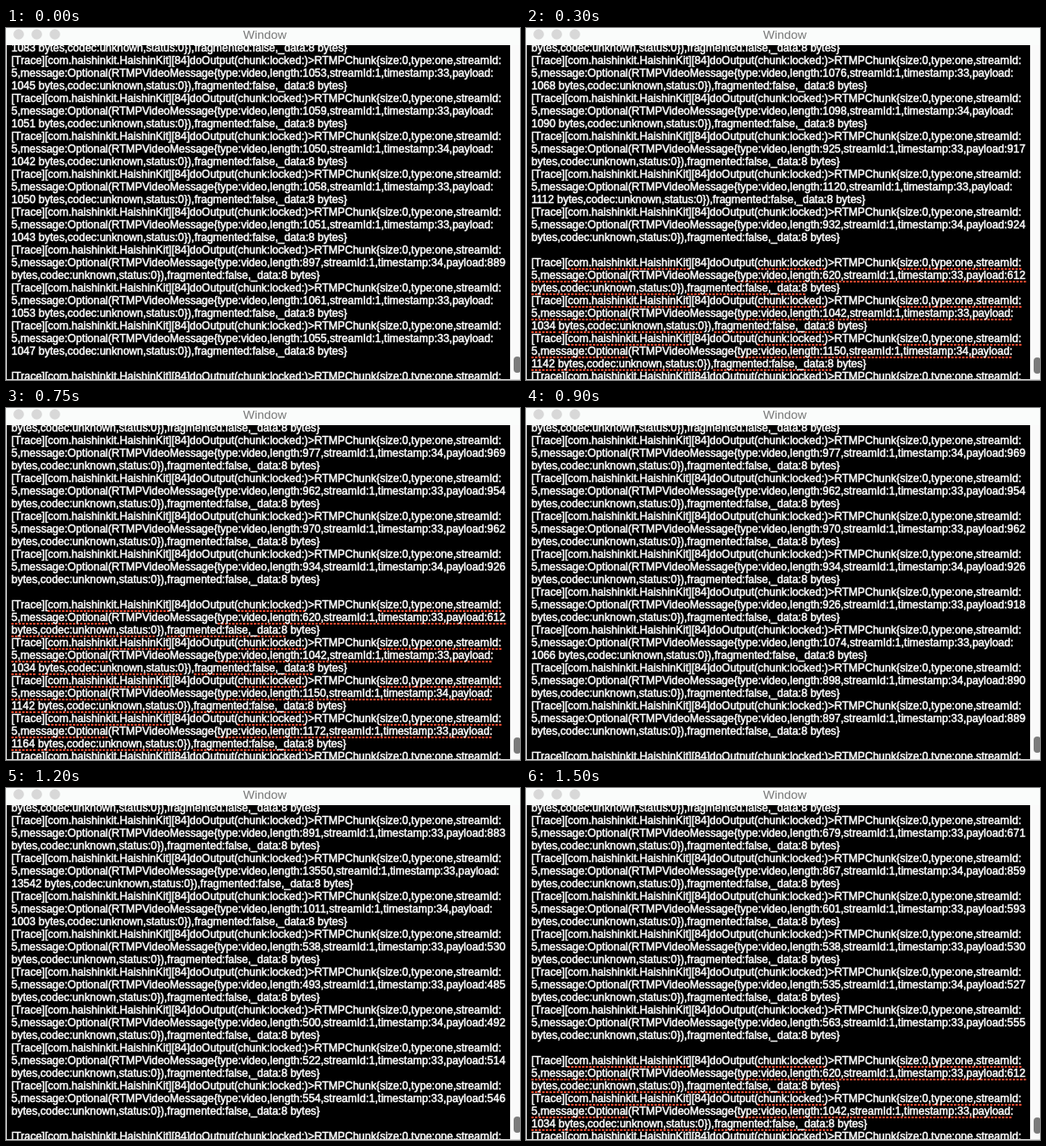
These frames come from a looping animation (568x390 px, 1600 ms). An HTML page with a canvas:

```html
<!DOCTYPE html>
<html lang="en">
<head>
<meta charset="utf-8">
<title>Window</title>
<style>
  html, body { margin: 0; width: 100%; height: 100%; overflow: hidden; background: #fff; }
  canvas { display: block; }
</style>
</head>
<body>
<canvas id="stage" width="568" height="390"></canvas>
<script>
const ctx = document.getElementById('stage').getContext('2d');
const STEP = 150, LOOP = 1600;
const LEFT = 6, LINE = 14, TOP = 26;
const FONT = '"Liberation Sans", Arial, sans-serif';
const MISSPELT = /com[^\]]+|chunk:locked:|size.*|5,message:Optional|type:video.*|^\d{4}(?= )|bytes,[^}]*|fragmented.*8(?= )/g;

// Each screen: timestamp phase, packet lengths, payload cut off at the top
const screens = [
  { phase: 0, sizes: [1053, 1059, 1050, 1058, 1051, 897, 1061, 1055], head: '1083 ' },
  { phase: 0, sizes: [1064, 921, 1072, 1085, 928], head: '1049 ' },
  { phase: 1, sizes: [1076, 1098, 925, 1120, 932] },
  { phase: 2, sizes: [918, 1090, 1069, 912, 941] },
  { phase: 0, sizes: [905, 1082, 924, 905, 955] },
  { phase: 2, sizes: [977, 962, 970, 934] },
  { phase: 2, sizes: [977, 962, 970, 934, 926, 1074, 898, 897] },
  { phase: 1, sizes: [903, 895, 1046, 889, 910, 894, 902, 1038] },
  { phase: 0, sizes: [891, 13550, 1011, 538, 493, 500, 522, 554] },
  { phase: 1, sizes: [586, 643, 612, 574, 559, 598] },
  { phase: 1, sizes: [679, 867, 601, 538, 535, 563] }
];
const pending = [620, 1042, 1150, 1172, 1160];
const ending = 'bytes,codec:unknown,status:0}),fragmented:false,_data:8 bytes}';

function packetLines(size, phase) {
  const payload = size - 8;
  const wraps = size > 999;
  const stamp = phase % 3 === 2 ? 34 : 33;
  return [
    '[Trace][com.haishinkit.HaishinKit][84]doOutput(chunk:locked:)>RTMPChunk{size:0,type:one,streamId:',
    `5,message:Optional(RTMPVideoMessage{type:video,length:${size},streamId:1,timestamp:${stamp},payload:${wraps ? '' : payload}`,
    (wraps ? payload + ' ' : '') + ending
  ];
}

const logLines = (sizes, phase) => sizes.flatMap((size, i) => packetLines(size, phase + i));

function drawDots(text, y) {
  ctx.fillStyle = '#f04a30';
  for (const match of text.matchAll(MISSPELT)) {
    const from = LEFT + ctx.measureText(text.slice(0, match.index)).width;
    const to = from + ctx.measureText(match[0]).width;
    for (let x = Math.round(from); x < to - 1; x += 4) ctx.fillRect(x, y + 2, 2.5, 2);
  }
}

function drawLog({ phase, sizes, head = '' }) {
  const done = [head + ending, ...logLines(sizes, phase), ''];
  const lines = done.concat(logLines(pending, 0));
  ctx.font = '12px ' + FONT;
  ctx.textAlign = 'left';
  ctx.strokeStyle = '#fff';
  ctx.lineWidth = 0.5;
  for (let i = 0; i < 27; i++) {
    const y = TOP + i * LINE;
    if (i >= done.length) drawDots(lines[i], y);
    ctx.fillStyle = '#fff';
    ctx.fillText(lines[i], LEFT, y);
    ctx.strokeText(lines[i], LEFT, y);
  }
}

function drawTitleBar() {
  ctx.fillStyle = '#fafcfb';
  ctx.fillRect(0, 0, 568, 19);
  ctx.fillStyle = '#d8d8d8';
  for (const x of [14, 34, 54]) {
    ctx.beginPath();
    ctx.arc(x, 7, 5.8, 0, Math.PI * 2);
    ctx.fill();
  }
  ctx.font = '13.5px ' + FONT;
  ctx.textAlign = 'center';
  ctx.fillStyle = '#777';
  ctx.fillText('Window', 286, 12);
}

function drawScroller(long) {
  ctx.fillStyle = '#fafafa';
  ctx.fillRect(557, 19, 11, 370);
  ctx.fillStyle = '#e6e6e6';
  ctx.fillRect(557, 19, 1, 370);
  ctx.fillStyle = '#7b7b7b';
  ctx.beginPath();
  ctx.roundRect(561, long ? 364 : 365, 8, 18, 4);
  ctx.fill();
}

function draw(time) {
  const index = Math.min(Math.floor((time % LOOP) / STEP), screens.length - 1);
  const screen = screens[index];
  ctx.fillStyle = '#d8d8d8';
  ctx.fillRect(0, 0, 568, 390);
  ctx.fillStyle = '#000';
  ctx.fillRect(1, 19, 556, 370);
  ctx.save();
  ctx.beginPath();
  ctx.rect(1, 19, 556, 370);
  ctx.clip();
  drawLog(screen);
  ctx.restore();
  drawScroller(screen.sizes.length === 8);
  drawTitleBar();
}

ctx.fontKerning = 'normal';
const start = performance.now();
function tick() {
  draw(performance.now() - start);
  requestAnimationFrame(tick);
}
tick();
</script>
</body>
</html>
```
